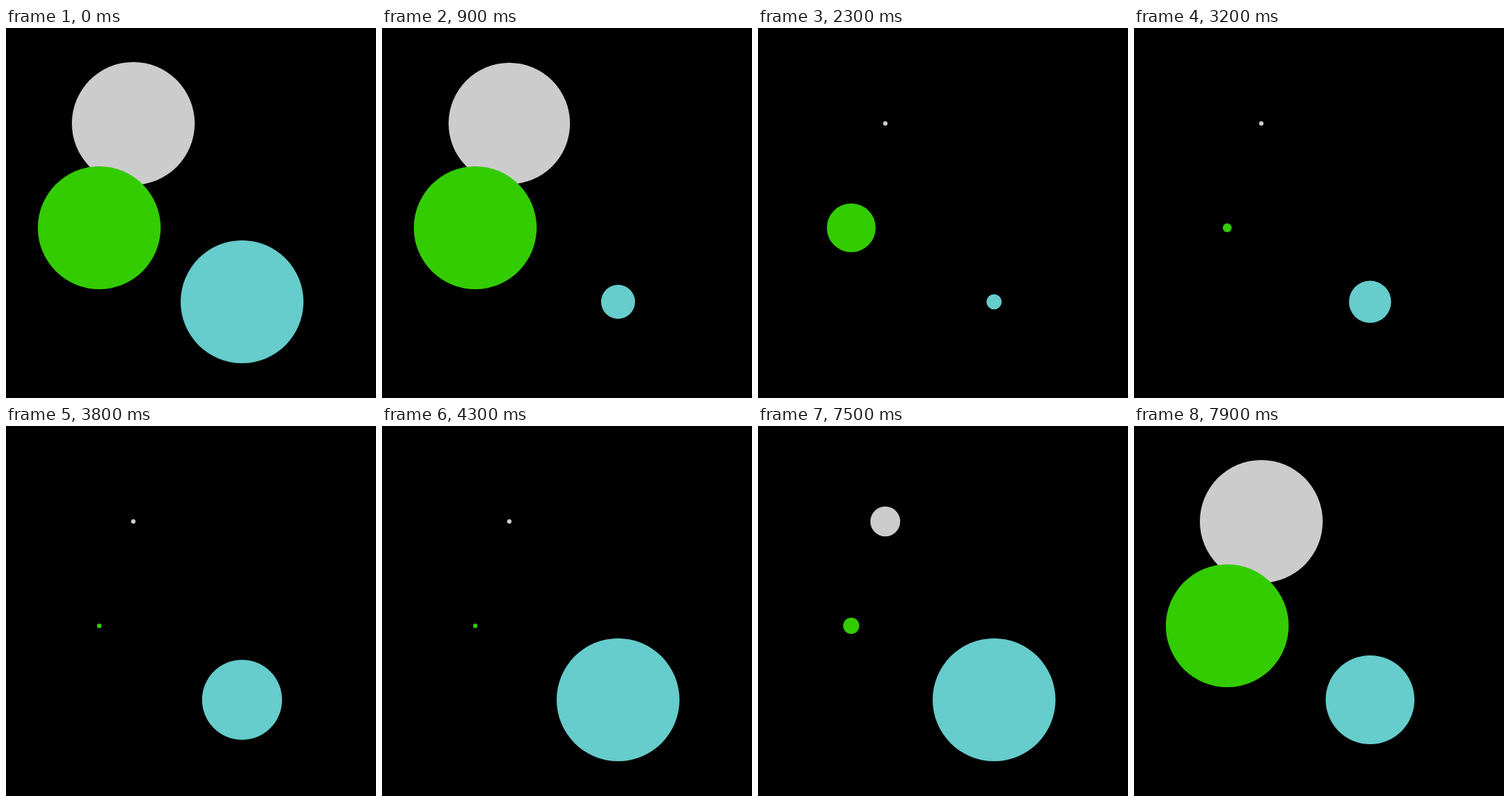
An HTML page that plays this animation: 500 px wide and 500 px high, repeating every 8000 ms.

```html
<!DOCTYPE html>
<html lang="en">
<head>
<meta charset="utf-8">
<title>Three circles</title>
<style>
  html, body { margin: 0; width: 100%; height: 100%; overflow: hidden; background: #000; }
  svg { display: block; width: 100%; height: 100%; }
</style>
</head>
<body>
<svg viewBox="0 0 500 500">
  <circle id="gray" cx="172" cy="129" r="83" fill="#ccc"/>
  <circle id="green" cx="126" cy="270" r="83" fill="#3c0"/>
  <circle id="cyan" cx="319" cy="370" r="83" fill="#6cc"/>
</svg>
<script>
const LOOP = 8000, STEP = 100, MAX = 83;

// [step, radius] keys, one step is 100 ms
const keys = {
  gray: [[0, 83], [8.7, 83], [23, 3], [69.7, 3], [70, 3.3], [77.8, 83], [80, 83]],
  green: [[0, 83], [18.3, 83], [23, 33], [32, 6], [38.3, 3], [70.9, 3], [78, 57], [79, 83], [80, 83]],
  cyan: [[0, 83], [5, 83], [6, 60], [7, 39.5], [9, 23], [14, 13], [18, 10], [20.5, 9.4],
    [24, 10.7], [28, 17.3], [32, 28.5], [36, 45], [41, 69], [43, 83], [78, 83], [79, 60], [80, 60]]
};

// Radius falls off as MAX / (1 + d * d), with d linear between keys
const toDist = r => Math.sqrt(MAX / r - 1);
const toRadius = d => MAX / (1 + d * d);

function radiusAt(list, s) {
  let i = 1;
  while (i < list.length - 1 && list[i][0] <= s) i++;
  const [s0, r0] = list[i - 1], [s1, r1] = list[i];
  const d0 = toDist(r0), d1 = toDist(r1);
  return toRadius(d0 + (d1 - d0) * (s - s0) / (s1 - s0));
}

const start = performance.now();

function draw(now) {
  const t = Math.max(0, now - start) % LOOP;
  const s = Math.floor(t / STEP);
  for (const id in keys) {
    document.getElementById(id).setAttribute("r", radiusAt(keys[id], s).toFixed(2));
  }
  requestAnimationFrame(draw);
}
draw(start);
</script>
</body>
</html>
```
